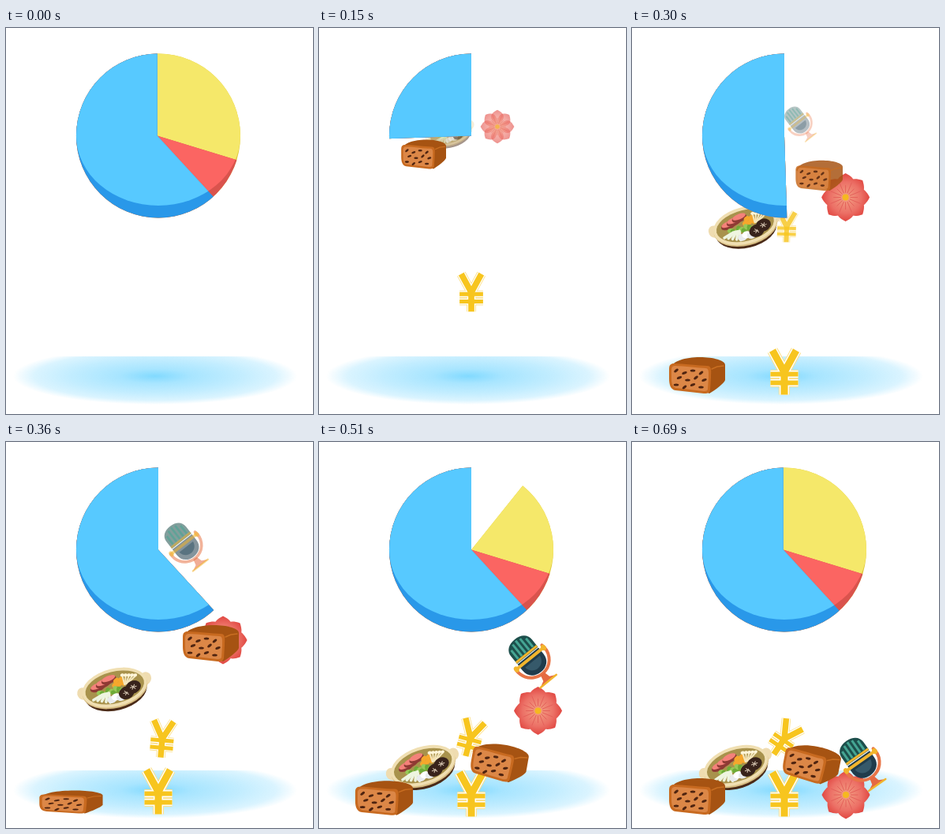
An HTML page with a canvas that plays this animation: 389x489 px, repeating every 720 ms.

```html
<!DOCTYPE html>
<html lang="en">
<head>
<meta charset="utf-8">
<title>Spending pie</title>
<style>
html, body { margin: 0; width: 100%; height: 100%; overflow: hidden; background: #fff; }
canvas { display: block; }
</style>
</head>
<body>
<canvas id="stage" width="389" height="489"></canvas>
<script>
const ctx = document.getElementById('stage').getContext('2d');
const LOOP = 720, STEP = 30, RAD = Math.PI / 180;

function lerpKeys(keys, t) {
  if (t <= keys[0][0]) return keys[0];
  for (let i = 1; i < keys.length; i++) {
    const a = keys[i - 1], b = keys[i];
    if (t <= b[0]) {
      const k = (t - a[0]) / (b[0] - a[0]);
      return a.map((v, j) => v + (b[j] - v) * k);
    }
  }
  return keys[keys.length - 1];
}

function shape(color, trace) {
  ctx.beginPath();
  trace();
  ctx.fillStyle = color;
  ctx.fill();
}

function oval(color, x, y, rx, ry = rx, turn = 0) {
  shape(color, () => ctx.ellipse(x, y, rx, ry, turn * RAD, 0, 7));
}

function line(color, width, ...pts) {
  ctx.beginPath();
  pts.forEach(([x, y]) => ctx.lineTo(x, y));
  ctx.strokeStyle = color;
  ctx.lineWidth = width;
  ctx.stroke();
}

function svg(color, d) {
  ctx.fillStyle = color;
  ctx.fill(new Path2D(d));
}

function yen() {
  ctx.lineCap = 'butt';
  ctx.lineJoin = 'round';
  const limbs = new Path2D('M-15-27.5L0 0L15-27.5M0-2V28.5');
  const bars = new Path2D('M-17.5 2.5H17.5M-17.5 13.5H17.5');
  for (const [color, grow] of [['#fbe08a', 5], ['#fff', 3], ['#f7c51e', 0]]) {
    ctx.strokeStyle = color;
    ctx.lineWidth = 9 + grow;
    ctx.stroke(limbs);
    ctx.lineWidth = 6 + grow;
    ctx.stroke(bars);
  }
}

function bread() {
  svg('#a65312', 'M-35-8C-33-18-15-23 3-23C20-23 35-19 35-13L35 6C34 10 22 19 15 23L-10 10Z');
  svg('#c86a20', 'M-30-15C-18-15 2-12 12-12C19-12 17-4 17 3L16 19C15 23 12 23 8 23L-28 19C-34 18-36 12-36 4V-8C-36-13-34-15-30-15Z');
  svg('#dc8747', 'M-28-12C-17-12 2-9 10-9C15-9 14-3 14 3L13 17C13 20 10 20 7 20L-27 16C-32 15-33 10-33 3V-6C-33-10-32-12-28-12Z');
  ctx.lineCap = 'round';
  line('#c96f22', 1.5, [18, -8], [25, -11], [33, -12]);
  for (let row = 0; row < 3; row++) {
    for (let i = 0; i < 4; i++) {
      const x = -27 + i * 10.5 + (row % 2) * 4;
      oval('#4f2410', x, -6 + row * 9 + (i % 2) * 3, 3.3, 1.6, -40 + (i + row) % 3 * 20);
    }
  }
}

function hotpot() {
  for (const side of [-1, 1]) oval('#efdcb0', side * 41, -3, 7, 8, side * 15);
  oval('#4b2b18', 0, 5, 40, 23);
  oval('#d8be84', 0, 1, 42, 24);
  oval('#f0dfb2', 0, -1, 42, 24);
  oval('#a8924c', 0, -1, 38, 20);
  for (let i = 0; i < 3; i++) {
    oval('#8f3a34', -21 + i * 8, -6 - i * 3, 10, 5, -8);
    oval('#f4827a', -21 + i * 8, -8 - i * 3, 9, 3.5, -8);
  }
  for (let i = 0; i < 5; i++) oval('#f6a72c', 1 + i * 3, -4 - i % 2 * 5, 4, 3, -30);
  for (let i = 0; i < 9; i++) {
    oval(i % 2 ? '#6eab38' : '#98c957', -20 + i * 3.5, 1 + i % 3 * 2, 4, 3, i * 40);
  }
  ctx.lineCap = 'round';
  for (let i = 0; i < 5; i++) {
    line('#f4e7be', 2, [13 + i, -2], [13 + i * 4, -13 + i]);
    oval('#fff5d8', 13 + i * 4, -14 + i, 2.5, 2);
    line('#eef5e0', 3.5, [-17 + i * 2, 4], [-30 + i * 5, 8 + i * 2]);
  }
  for (let i = 0; i < 3; i++) oval(i % 2 ? '#fff' : '#e9ecef', -7 + i * 6, 13 - i % 2 * 2, 6, 4.5);
  for (const [x, y] of [[13, 9], [23, 4]]) {
    oval('#38231b', x, y, 10, 8, -10);
    for (let a = 0; a < 3; a++) {
      const dx = 4 * Math.cos(a * Math.PI / 3), dy = 3 * Math.sin(a * Math.PI / 3);
      line('#d9c9b5', 1, [x - dx, y - dy], [x + dx, y + dy]);
    }
  }
}

function petals(color, length, width, offset) {
  for (let i = 0; i < 8; i++) {
    ctx.save();
    ctx.rotate((i * 45 + offset) * RAD);
    shape(color, () => {
      ctx.moveTo(0, 0);
      ctx.bezierCurveTo(-width, -length * .5, -width, -length * .75, 0, -length);
      ctx.bezierCurveTo(width, -length * .75, width, -length * .5, 0, 0);
    });
    ctx.restore();
  }
}

function flower() {
  const tint = ctx.createRadialGradient(0, 0, 3, 0, 0, 31);
  tint.addColorStop(0, '#f29a80');
  tint.addColorStop(.6, '#ec7066');
  tint.addColorStop(1, '#e0453f');
  petals(tint, 30.5, 15, 0);
  ctx.lineCap = 'round';
  for (let i = 0; i < 16; i++) {
    const a = i * 22.5 * RAD, far = i % 2 ? 20 : 15;
    line('#e4605a', 1, [6 * Math.cos(a), 6 * Math.sin(a)], [far * Math.cos(a), far * Math.sin(a)]);
  }
  oval('#f5b820', 0, 0, 4);
}

function mic() {
  ctx.lineCap = 'round';
  ctx.beginPath();
  ctx.arc(0, 1, 23, -.25, Math.PI + .1);
  ctx.strokeStyle = '#e87548';
  ctx.lineWidth = 4;
  ctx.stroke();
  svg('#e56a42', 'M-3 24H3L5 32L13 36H-13L-5 32Z');
  line('#f2b52d', 2.5, [-13, 36], [13, 36]);
  svg('#203c4c', 'M-17-5H17V5C17 15 10 21 0 21S-17 15-17 5Z');
  svg('#36596a', 'M-12 4H12C11 11 6 15 0 15S-11 11-12 4Z');
  svg('#1d4f4c', 'M-17-6V-18C-17-27-10-32 0-32S17-27 17-18V-6Z');
  ctx.lineCap = 'butt';
  for (let i = -2; i <= 2; i++) {
    line('#45a593', 3, [i * 6, -10], [i * 6, -30 + i * i * 1.5]);
  }
  line('#f2b52d', 3, [-17, -8], [17, -8]);
  line('#f2b52d', 4, [-22, -1], [22, -1]);
  for (const x of [-22, 22]) oval('#f2b52d', x, -1, 3, 4);
}

// Each key: time, x, y, scale, turn, alpha, stretch x, stretch y
const key = (t, x, y, scale = 1, turn = 0, alpha = 1, sx = 1, sy = 1) =>
  [t, x, y, scale, turn, alpha, sx, sy];

const items = [
  [yen, [key(150, 190, 100, .2, 0, 0), key(210, 190, 114, .3, 0, .4), key(270, 195, 190, .6, 0, .7),
    key(360, 198, 376, .83, 5), key(450, 191, 374, .83, -12), key(510, 192, 375, .83, 15),
    key(570, 193, 376, .83, 34)]],
  [hotpot, [key(90, 180, 105, .4, -20, 0), key(210, 152, 160, .95, -14), key(360, 138, 312, 1, -14),
    key(450, 132, 411, 1, -18)]],
  [bread, [key(30, 188, 85, .25, 0, 0), key(90, 177, 93, .5, 0, .6), key(150, 133, 160, .8),
    key(210, 87, 283), key(300, 83, 440), key(360, 83, 456, 1, 0, 1, 1.13, .63),
    key(450, 83, 444, 1, 0, 1, .87, 1.24), key(510, 83, 451, 1, 0, 1, 1.03, .95), key(570, 83, 449)]],
  [yen, [key(30, 193, 140, .4, 0, 0), key(90, 193, 212, .66, 0, .75), key(150, 193, 335, .85),
    key(210, 193, 446), key(300, 193, 436), key(360, 193, 443), key(390, 193, 446)]],
  [flower, [key(90, 184, 100, .3, 0, 0), key(150, 226, 125, .7, 0, .6), key(210, 264, 160),
    key(360, 275, 251), key(450, 278, 306), key(570, 277, 375), key(690, 271, 447)]],
  [bread, [key(150, 180, 95, .2, 0, 0), key(210, 191, 107, .36, 0, .5), key(285, 232, 170, .8, 0, .8),
    key(360, 260, 255), key(450, 235, 379, 1, 6), key(510, 229, 406, 1, 10), key(570, 228, 408, 1, 11)]],
  [mic, [key(210, 190, 104, .3, -38, 0), key(360, 226, 130, .92, -38, .55), key(450, 250, 190, 1, -38),
    key(510, 268, 275, 1, -39), key(570, 284, 368, 1, -40), key(630, 289, 397, 1, -36),
    key(690, 290, 405, 1, -35)]]
];

function drawItem([draw, keys], t) {
  const [, x, y, scale, turn, alpha, sx, sy] = lerpKeys(keys, t);
  if (alpha <= 0) return;
  ctx.save();
  ctx.globalAlpha = alpha;
  ctx.translate(x, y);
  ctx.rotate(turn * RAD);
  ctx.scale(scale * sx, scale * sy);
  draw();
  ctx.restore();
}

const sweepKeys = [[30, 30], [90, 63.2], [210, 120.8], [360, 222.6], [450, 282.5], [570, 360]];
const slices = [
  [360, '#f5e86a', '#dfc93f'],
  [253, '#fb6562', '#d9534d'],
  [222.6, '#57c9ff', '#2998e9']
];

// Slices all start at twelve o'clock, so the later ones cover the earlier ones.
function drawPie(sweep) {
  const cx = 193, cy = 136.5, r = 104;
  const apex = sweep < 360 ? cx : cx - 1.3;
  for (const [end, face, rim] of slices) {
    ctx.save();
    ctx.beginPath();
    ctx.moveTo(apex, cy);
    ctx.arc(apex, cy, r + 3, -90 * RAD, (-90 - Math.min(end, sweep)) * RAD, true);
    ctx.clip();
    oval(rim, cx, cy, r);
    shape(face, () => {
      ctx.arc(cx, cy, r, Math.PI, 0);
      ctx.ellipse(cx, cy, r, 88.5, 0, 0, Math.PI);
    });
    ctx.restore();
  }
}

function drawShadow() {
  ctx.save();
  ctx.beginPath();
  ctx.rect(0, 416, 389, 73);
  ctx.clip();
  ctx.translate(189, 441);
  ctx.scale(1, .2);
  const glow = ctx.createRadialGradient(0, 0, 0, 0, 0, 180);
  [[0, .75], [.25, .52], [.6, .36], [.85, .22], [1, 0]].forEach(([at, a]) =>
    glow.addColorStop(at, `rgba(87,205,255,${a})`));
  oval(glow, 0, 0, 180);
  ctx.restore();
}

function render(now) {
  const t = Math.floor(now % LOOP / STEP) * STEP;
  ctx.clearRect(0, 0, 389, 489);
  drawShadow();
  if (t >= STEP) items.forEach(item => drawItem(item, t));
  drawPie(t < STEP ? 360 : lerpKeys(sweepKeys, t)[1]);
}

let start;
function tick(now) {
  start ??= now;
  render(now - start);
  requestAnimationFrame(tick);
}
render(0);
requestAnimationFrame(tick);
</script>
</body>
</html>
```
